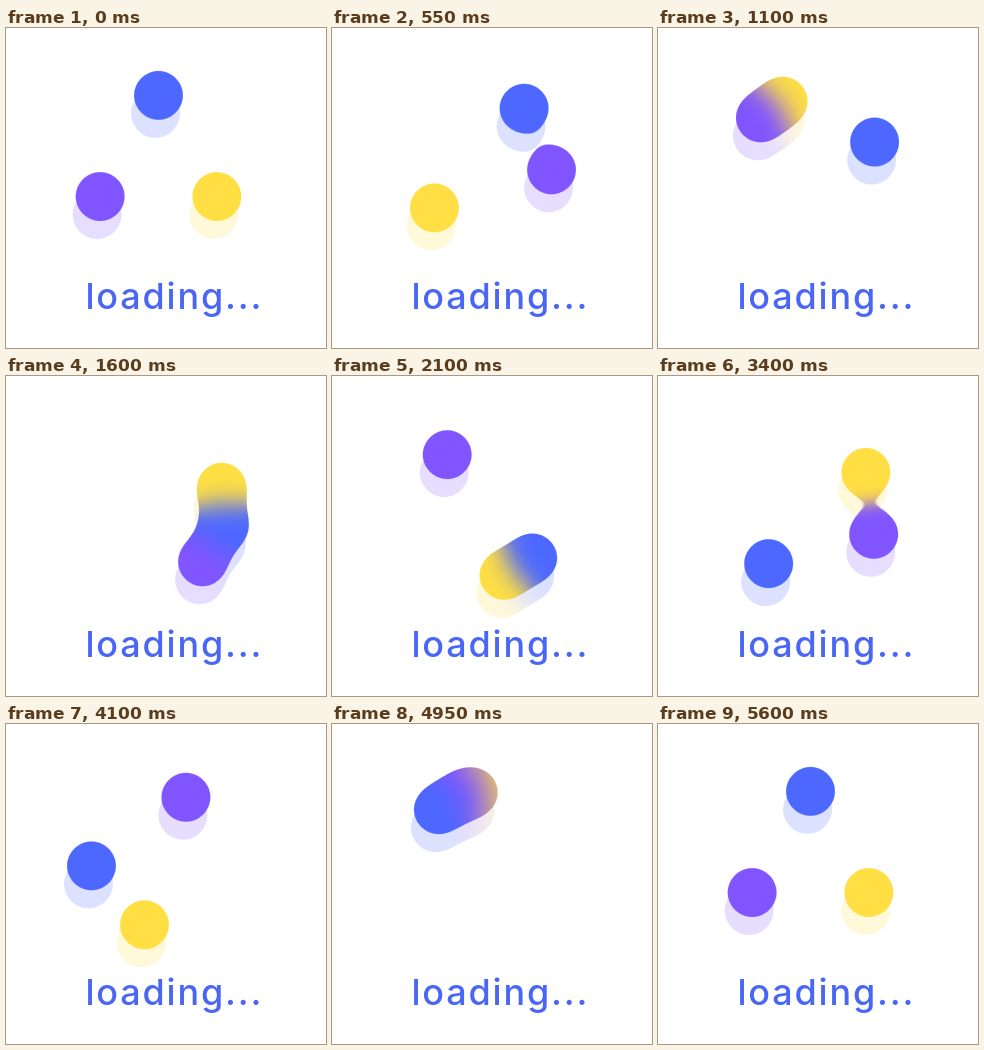
These frames come from a looping animation (320 px wide and 320 px high, 5650 ms). An HTML page:

```html
<!DOCTYPE html>
<html lang="en">
<head>
<meta charset="utf-8">
<title>Loading</title>
<style>
  html, body { margin: 0; width: 100%; height: 100%; overflow: hidden; background: #fff; }
  svg { display: block; width: 100%; height: 100%; }
  text { font: 500 36px Inter, Roboto, sans-serif; font-optical-sizing: none; letter-spacing: 1.8px; fill: #4a66f5; }
</style>
</head>
<body>
<svg viewBox="0 0 320 320">
  <!-- Blur and threshold fuse nearby balls; a pale offset copy is the shadow -->
  <filter id="goo" filterUnits="userSpaceOnUse" x="0" y="0" width="320" height="320" color-interpolation-filters="sRGB">
    <feGaussianBlur stdDeviation="12"/>
    <feColorMatrix values="1 0 0 0 0  0 1 0 0 0  0 0 1 0 0  0 0 0 30 -11.4" result="balls"/>
    <feOffset dx="-3.5" dy="18"/>
    <feComponentTransfer result="shadow"><feFuncA type="linear" slope="0.2"/></feComponentTransfer>
    <feMerge><feMergeNode in="shadow"/><feMergeNode in="balls"/></feMerge>
  </filter>
  <g id="balls" filter="url(#goo)"></g>
  <text x="79.5" y="281">loading...</text>
</svg>
<script>
  const CENTER = { x: 152.5, y: 134.8 }, ORBIT = 67.4, RADIUS = 24.3;
  const LOOP = 5650, STEP = 50, TURN_STEPS = 150;

  // Back to front: start angle in degrees, whole turns per loop
  const balls = [
    { color: '#ffdf43', start: 30, turns: 3 },
    { color: '#8055ff', start: 150, turns: 6 },
    { color: '#4d68ff', start: -90, turns: 1 }
  ];

  const group = document.getElementById('balls');
  for (const ball of balls) {
    ball.node = document.createElementNS('http://www.w3.org/2000/svg', 'circle');
    ball.node.setAttribute('r', RADIUS);
    ball.node.setAttribute('fill', ball.color);
    group.append(ball.node);
  }

  function draw(time) {
    // Every fourth of the 150 rotation steps is skipped
    const tick = Math.floor(time % LOOP / STEP);
    const progress = Math.ceil(tick * 4 / 3) / TURN_STEPS;
    for (const { node, start, turns } of balls) {
      const angle = (start + 360 * turns * progress) * Math.PI / 180;
      node.setAttribute('cx', CENTER.x + ORBIT * Math.cos(angle));
      node.setAttribute('cy', CENTER.y + ORBIT * Math.sin(angle));
    }
  }

  function loop(now) {
    draw(now);
    requestAnimationFrame(loop);
  }
  draw(0);
  requestAnimationFrame(loop);
</script>
</body>
</html>
```
